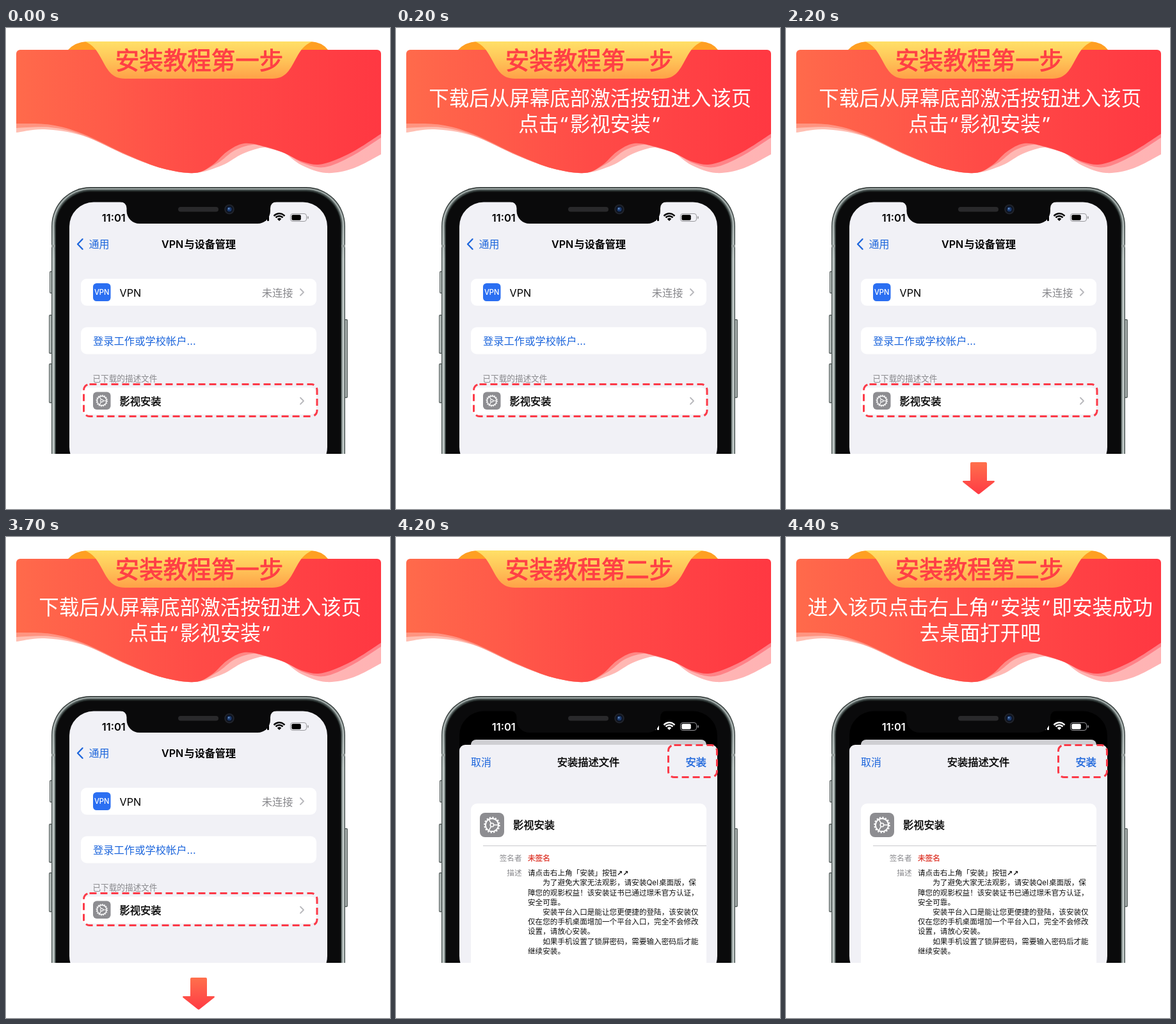
An HTML page with a canvas that plays this animation: 600x750 px, repeating every 8400 ms.

```html
<!DOCTYPE html>
<html lang="zh-CN">
<head>
<meta charset="utf-8">
<title>安装教程</title>
<style>
html, body { margin: 0; width: 100%; height: 100%; overflow: hidden; background: #fff; }
canvas { display: block; width: 600px; height: 750px; }
</style>
</head>
<body>
<canvas id="stage" width="600" height="750"></canvas>
<script>
const ctx = document.getElementById('stage').getContext('2d');
const LOOP = 8400;
const UI = "Inter, 'Noto Sans CJK SC', 'Noto Sans CJK JP', sans-serif";
const HEAD = "'Noto Sans', 'Noto Sans CJK SC', 'Noto Sans CJK JP', sans-serif";
const BLUE = '#1d66dc', RED = '#fc3a48', GREY = '#88888c', PAPER = '#f1f1f6', BEZEL = '#0a0a0b';

// y is the middle of the glyph box; medium thickens the regular weight
function text(str, x, y, size, color, { weight = 400, align = 'left', family = UI, medium = false } = {}) {
  ctx.font = `${weight} ${size}px ${family}`;
  ctx.textAlign = align;
  ctx.textBaseline = 'alphabetic';
  ctx.fillStyle = color;
  ctx.fillText(str, x, y + size * 0.37);
  if (medium) {
    ctx.strokeStyle = color;
    ctx.lineWidth = size * 0.026;
    ctx.lineJoin = 'round';
    ctx.strokeText(str, x, y + size * 0.37);
  }
}

function box(x, y, w, h, r, fill) {
  ctx.beginPath();
  ctx.roundRect(x, y, w, h, r);
  ctx.fillStyle = fill;
  ctx.fill();
}

function gradient(x0, y0, x1, y1, ...colors) {
  const g = ctx.createLinearGradient(x0, y0, x1, y1);
  colors.forEach((c, i) => g.addColorStop(i / (colors.length - 1), c));
  return g;
}

function shape(d, fill) {
  ctx.fillStyle = fill;
  ctx.fill(new Path2D(d));
}

function dashedBox(x, y, w, h) {
  ctx.beginPath();
  ctx.roundRect(x, y, w, h, 9);
  ctx.setLineDash([11, 6]);
  ctx.lineWidth = 3;
  ctx.strokeStyle = RED;
  ctx.stroke();
  ctx.setLineDash([]);
}

function chevron(x, y, dx, dy, color, width) {
  ctx.beginPath();
  ctx.moveTo(x - dx, y - dy);
  ctx.lineTo(x, y);
  ctx.lineTo(x - dx, y + dy);
  ctx.strokeStyle = color;
  ctx.lineWidth = width;
  ctx.lineCap = ctx.lineJoin = 'round';
  ctx.stroke();
  ctx.lineCap = 'butt';
}

function gearIcon(x, y, size) {
  box(x, y, size, size, size * 0.21, '#8d8d91');
  const cx = x + size / 2, cy = y + size / 2, r = size * 0.265;
  const ring = (radius, width) => {
    ctx.beginPath();
    ctx.arc(cx, cy, radius, 0, Math.PI * 2);
    ctx.lineWidth = width;
    ctx.stroke();
  };
  ctx.strokeStyle = '#fff';
  ring(r, size * 0.05);
  const tooth = 2 * Math.PI * r * 1.17 / 32;
  ctx.setLineDash([tooth, tooth]);
  ring(r * 1.17, size * 0.05);
  ctx.setLineDash([]);
  ring(r * 0.27, size * 0.04);
  ctx.lineWidth = size * 0.04;
  for (let i = 0; i < 3; i++) {
    const a = i * Math.PI * 2 / 3;
    ctx.beginPath();
    ctx.moveTo(cx + Math.cos(a) * r * 0.3, cy + Math.sin(a) * r * 0.3);
    ctx.lineTo(cx + Math.cos(a) * r, cy + Math.sin(a) * r);
    ctx.stroke();
  }
}

// Header body whose lower edge runs smoothly through the points
function wave(points, fill) {
  const at = i => points[Math.max(0, Math.min(points.length - 1, i))];
  ctx.beginPath();
  ctx.moveTo(16, 120);
  ctx.lineTo(...points[0]);
  for (let i = 0; i < points.length - 1; i++) {
    const [a, b, c, d] = [at(i - 1), at(i), at(i + 1), at(i + 2)];
    ctx.bezierCurveTo(
      b[0] + (c[0] - a[0]) / 6, b[1] + (c[1] - a[1]) / 6,
      c[0] - (d[0] - b[0]) / 6, c[1] - (d[1] - b[1]) / 6, c[0], c[1]);
  }
  ctx.lineTo(586, 120);
  ctx.fillStyle = fill;
  ctx.fill();
}

function header(title, lines) {
  const body = gradient(16, 0, 586, 0, '#ff6a4b', '#ff4b47', '#ff3842');
  wave([[16, 163], [60, 158], [120, 168], [190, 199], [245, 219], [295, 226], [338, 214],
    [370, 196], [405, 186], [432, 193], [462, 214], [500, 226], [542, 219], [586, 197]],
    gradient(16, 0, 586, 0, '#ffbfb2', '#ffb3b4'));
  wave([[16, 156], [70, 155], [120, 167], [190, 199], [245, 219], [295, 226], [330, 211],
    [357, 191], [385, 182], [405, 186], [435, 195], [465, 211], [498, 217], [540, 200], [586, 171]],
    gradient(16, 0, 586, 0, '#ff9580', '#ff8088'));
  wave([[16, 149], [70, 151], [120, 165], [190, 198], [245, 219], [295, 226], [322, 214],
    [345, 193], [372, 180], [405, 185], [435, 195], [465, 209], [495, 212], [540, 194], [586, 165]], body);
  box(16, 34, 570, 90, [6, 6, 0, 0], body);

  shape('M97 34 Q108 22 126 21 L156 34 Z', '#ff9f22');
  shape('M503 34 Q494 22 476 21 L446 34 Z', '#ff9f22');
  shape('M123 21 H479 C466 26 460 35 454 46 C444 64 438 79 416 79 H186 C164 79 158 64 148 46 C142 35 136 26 123 21 Z',
    gradient(0, 21, 0, 79, '#ffe067', '#ffc458', '#ffa148'));
  const opt = { align: 'center', family: HEAD };
  text(title, 302, 50, 37.5, '#ff3f45', { ...opt, medium: true });
  lines.forEach((s, i) => {
    const spaced = s.replace(/[“”]/g, '\u200a$&\u200a');
    text(spaced, 303.3, 109.4 + i * 40, 31.5, '#fff', opt);
  });
}

function phoneBody() {
  const button = (x, y, w, h) => {
    box(x, y, w, h, 2, '#5a6261');
    box(x + 1, y + 1.5, w - 2, h - 3, 1, gradient(x, 0, x + w, 0, '#d0d7d5', '#7d8684'));
  };
  button(68, 379, 6, 35);
  button(67, 447, 6, 61);
  button(67, 523, 6, 62);
  button(528, 454, 6, 123);
  const metal = (top, side) => gradient(0, 248, 0, 360, top, side);
  const layers = [
    [0, metal('#2b3231', '#4a5352')], [1.4, metal('#97a19f', '#c3ccca')],
    [4, metal('#3d4645', '#8a9492')], [6, '#1c2221'], [7.5, BEZEL]
  ];
  for (const [d, c] of layers) box(71 + d, 248 + d, 459 - 2 * d, 520, 61 - d, c);
  ctx.fillStyle = '#949c9a';
  ctx.fillRect(71, 338, 6, 4);
  ctx.fillRect(524, 338, 6, 4);
}

function statusBar(color) {
  text('11:01', 168.3, 295.7, 16.5, color, { weight: 600, align: 'center' });
  box(403.5, 294, 2.8, 7, 1, color);
  box(408, 290, 3, 11, 1, color);
  ctx.strokeStyle = color;
  ctx.lineWidth = 2.5;
  for (const r of [11.2, 7.3]) {
    ctx.beginPath();
    ctx.arc(427, 300.5, r, -Math.PI * 0.77, -Math.PI * 0.23);
    ctx.stroke();
  }
  ctx.beginPath();
  ctx.moveTo(427, 301);
  ctx.arc(427, 300.5, 4.3, -Math.PI * 0.77, -Math.PI * 0.23);
  ctx.fillStyle = color;
  ctx.fill();
  ctx.beginPath();
  ctx.roundRect(444.5, 289.5, 25, 12, 3.6);
  ctx.strokeStyle = '#98989c';
  ctx.lineWidth = 1;
  ctx.stroke();
  box(446.3, 291.3, 14.5, 8.4, 2, color);
  box(471, 293.5, 1.7, 4, 1, '#98989c');
}

function notch() {
  shape('M178 271 Q188 271.5 188.5 281 V285 A20 20 0 0 0 208.5 305 H393 A20 20 0 0 0 413 285 V281 Q413.5 271.5 423 271 Z', BEZEL);
  box(269, 279, 63, 7.5, 3.7, '#29292b');
  const disc = (r, c, dx = 0, dy = 0) => {
    ctx.beginPath();
    ctx.arc(349 + dx, 282.7 + dy, r, 0, Math.PI * 2);
    ctx.fillStyle = c;
    ctx.fill();
  };
  disc(7.8, '#20232b');
  disc(5.6, '#0b1220');
  disc(3.6, '#1c3a6c');
  disc(1.3, '#6a94cc', -0.8, -1);
}

function listPage() {
  ctx.fillStyle = PAPER;
  ctx.fillRect(99, 271, 403, 393);
  statusBar('#000');
  chevron(112, 337, -7.5, 7.8, BLUE, 2.3);
  text('通用', 129.5, 337, 16, BLUE);
  text('VPN\u200a与设备管理', 301, 337, 16.1, '#000', { weight: 600, align: 'center' });
  for (const y of [391, 466.5, 560.5]) box(117, y, 368, 42, 9, '#fff');
  box(136, 398, 27.5, 28, 5.5, '#2b6ff2');
  text('VPN', 149.7, 412, 11.2, '#fff', { weight: 500, align: 'center' });
  text('VPN', 177.5, 413, 16.2, '#000');
  text('未连接', 448.5, 413, 16.3, GREY, { align: 'right' });
  chevron(465, 412, 5, 5, '#b8b8bc', 1.8);
  text('登录工作或学校帐户...', 136, 487.6, 16.3, BLUE);
  text('已下载的描述文件', 135.5, 546.7, 12.6, GREY);
  gearIcon(136, 567.5, 27.5);
  text('影视安装', 177.5, 581.7, 16.3, '#000', { medium: true });
  chevron(465, 581.5, 5, 5, '#b8b8bc', 1.8);
}

const NOTE = [
  '请点击右上角「安装」按钮',
  '\u3000\u3000为了避免大家无法观影，请安装Qel\u200a桌面版，保',
  '障您的观影权益！该安装证书已通过璟禾官方认证，',
  '安全可靠。',
  '\u3000\u3000安装平台入口是能让您更便捷的登陆，该安装仅',
  '仅在您的手机桌面增加一个平台入口，完全不会修改',
  '设置，请放心安装。',
  '\u3000\u3000如果手机设置了锁屏密码，需要输入密码后才能',
  '继续安装。'
];

function sheetPage() {
  ctx.fillStyle = '#000';
  ctx.fillRect(99, 271, 403, 393);
  statusBar('#fff');
  box(117, 316, 368, 20, [8, 8, 0, 0], '#cfcfd3');
  box(99, 324, 403, 345, [9, 9, 0, 0], PAPER);
  text('取消', 117, 351, 16, BLUE);
  text('安装描述文件', 300.5, 351, 16.3, '#000', { align: 'center', medium: true });
  text('安装', 485, 351, 16.3, BLUE, { align: 'right', medium: true });
  box(117, 415.5, 368, 255, [10, 10, 0, 0], '#fff');
  gearIcon(131, 430, 38);
  text('影视安装', 183, 448.7, 16.3, '#000', { medium: true });
  ctx.fillStyle = '#c9c9cd';
  ctx.fillRect(136, 481, 349, 1);
  text('签名者', 196.5, 500.3, 11.6, GREY, { align: 'right' });
  text('未签名', 206, 500.3, 11.6, '#dd3529', { medium: true });
  text('描述', 196.5, 524, 11.6, GREY, { align: 'right' });
  NOTE.forEach((s, i) => text(s, 206, 524 + i * 15.2, 11.6, '#111'));
  text('↗↗', 345, 524, 11, '#111', { weight: 700, family: "'DejaVu Sans', sans-serif" });
}

function phone(page) {
  ctx.save();
  ctx.beginPath();
  ctx.rect(0, 240, 600, 424);
  ctx.clip();
  phoneBody();
  ctx.save();
  ctx.beginPath();
  ctx.roundRect(99, 271.5, 403, 420, 38);
  ctx.clip();
  page();
  ctx.restore();
  notch();
  ctx.restore();
}

function arrow(y) {
  shape(`M290 ${y} H312 Q314 ${y} 314 ${y + 2} V${y + 29} H325 Q327 ${y + 30} 325 ${y + 31.5}
    L302.5 ${y + 49.3} Q301 ${y + 50.4} 299.5 ${y + 49.3} L277 ${y + 31.5} Q275 ${y + 30} 277 ${y + 29}
    H288 V${y + 2} Q288 ${y} 290 ${y} Z`, gradient(0, y, 0, y + 50, '#ff704c', '#ff5549', '#ff3a43'));
}

function draw(t) {
  ctx.fillStyle = '#fff';
  ctx.fillRect(0, 0, 600, 750);
  if (t < 4200) {
    header('安装教程第一步', t < 200 ? [] : ['下载后从屏幕底部激活按钮进入该页', '点击“影视安装”']);
    phone(listPage);
    dashedBox(121.5, 555.5, 364.5, 50);
    if (t >= 2200) arrow(677 + Math.floor((t - 2200) / 500) % 2 * 10);
  } else {
    header('安装教程第二步', t < 4400 ? [] : ['进入该页点击右上角“安装”即安装成功', '去桌面打开吧']);
    phone(sheetPage);
    dashedBox(425.5, 324.5, 76, 50);
  }
}

function tick() {
  draw(performance.now() % LOOP);
  requestAnimationFrame(tick);
}
tick();
</script>
</body>
</html>
```
